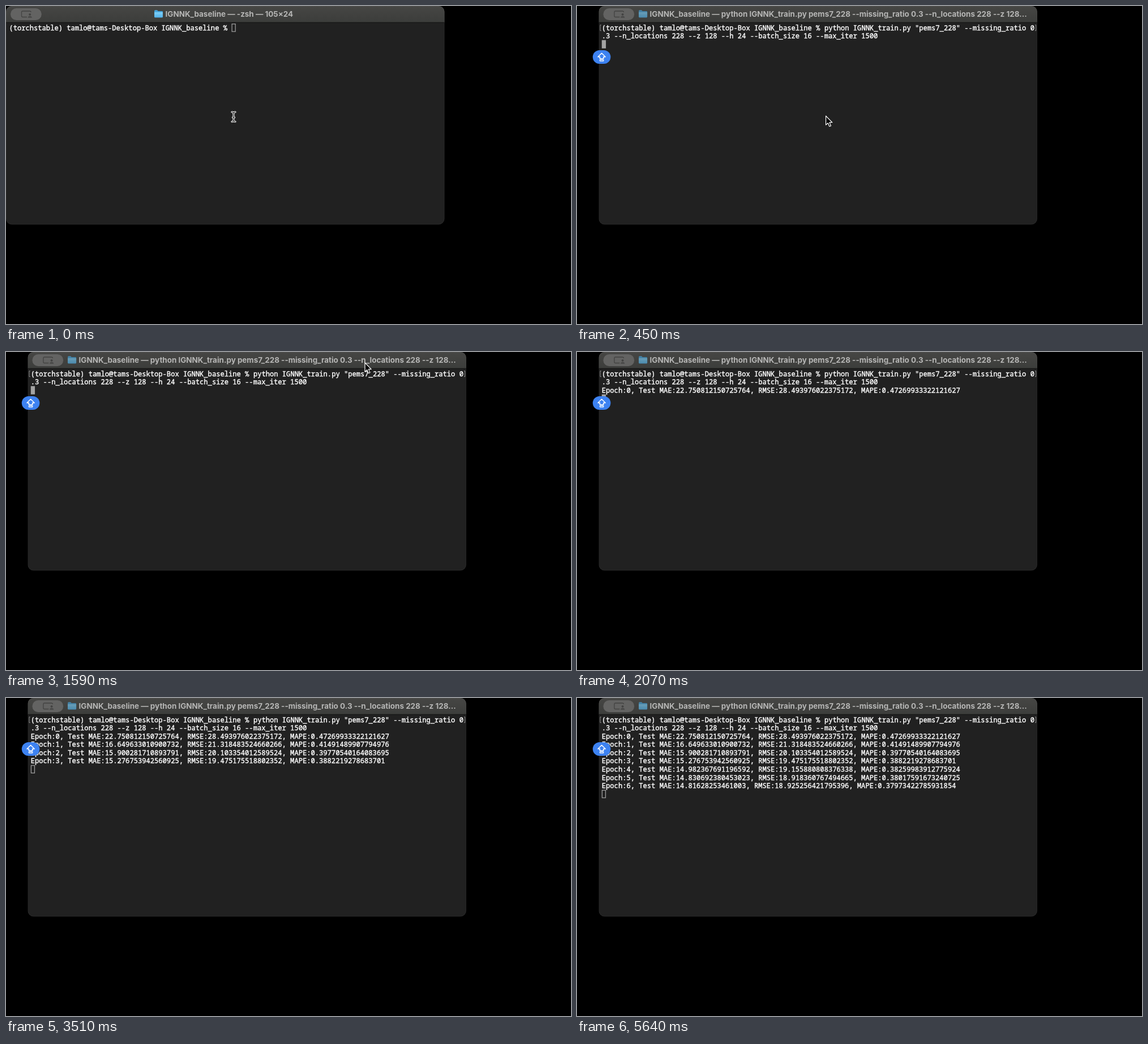
These frames come from a looping animation (998x561 px, 5.67 s). An HTML page:

```html
<!DOCTYPE html>
<html lang="en">
<head>
<meta charset="utf-8">
<title>Terminal training run</title>
<style>
  html, body { margin: 0; width: 100%; height: 100%; overflow: hidden; background: #000; }
  svg { display: block; }
  text { white-space: pre; }
  .mono { font: 500 12.133px "Noto Sans Mono", "DejaVu Sans Mono", monospace; fill: #fff; stroke: #fff; stroke-width: .4px; }
  .selected { font-weight: 400; fill: #161616; stroke: none; }
  .title { font: 700 13.45px Inter, "Liberation Sans", sans-serif; fill: #b6b6b5; }
</style>
</head>
<body>
<svg width="998" height="561" viewBox="0 0 998 561">
  <defs>
    <linearGradient id="bar" x2="0" y2="1">
      <stop offset="0" stop-color="#464644"/>
      <stop offset="1" stop-color="#3c3d3b"/>
    </linearGradient>
    <linearGradient id="folderFill" x2="0" y2="1">
      <stop offset="0" stop-color="#7fd0f8"/>
      <stop offset="1" stop-color="#52b2ea"/>
    </linearGradient>
    <clipPath id="frame"><rect width="774.5" height="385.5" rx="10"/></clipPath>
    <path id="beam" d="M-3-8.5Q0-8.5 0-6Q0-8.5 3-8.5M0-6V6M-3 8.5Q0 8.5 0 6Q0 8.5 3 8.5M-1.5 1H1.5"/>
  </defs>
  <rect width="998" height="561" fill="#000"/>
  <g id="win">
    <g clip-path="url(#frame)">
      <rect width="775" height="386" fill="#212121"/>
      <rect width="775" height="29" fill="url(#bar)"/>
      <rect y="28.6" width="775" height="1" fill="#111"/>
    </g>
    <rect x=".5" y=".5" width="773.5" height="384.5" rx="9.5" fill="none" stroke="#fff" stroke-opacity=".04"/>
    <rect x="8" y="4" width="54.8" height="21" rx="10.5" fill="#636362"/>
    <g fill="none" stroke="#434342" stroke-width="1.3">
      <path d="M37 19.5H29.5a2 2 0 0 1-2-2V11a2 2 0 0 1 2-2H42a2 2 0 0 1 2 2"/>
      <circle cx="42.2" cy="15" r="2" fill="#434342" stroke="none"/>
      <path d="M38.3 20.5a4 3.2 0 0 1 7.8 0z" fill="#434342" stroke="none"/>
    </g>
    <g id="folder">
      <path d="M0 1.5Q0 0 1.5 0H5L6.6 1.7H13.6Q15 1.7 15 3V11.5Q15 13 13.5 13H1.5Q0 13 0 11.5z" fill="#45a5dc"/>
      <path d="M0 3.6H15V11.5Q15 13 13.5 13H1.5Q0 13 0 11.5z" fill="url(#folderFill)"/>
    </g>
    <text id="title" class="title" y="18.8"></text>
    <path id="marks" d="M4.3 33.5H2.6V43.5H4.3M770.6 33.5H772.3V43.5H770.6" fill="none" stroke="#8e8e8e"/>
    <g id="selection" fill="#fff"></g>
    <g id="lines"></g>
    <rect id="caret"/>
    <g id="bubble">
      <rect x="-15.6" y="-11.5" width="31.2" height="24.5" rx="12" fill="#000" opacity=".15"/>
      <rect x="-15.8" y="-12" width="31.6" height="24" rx="12" fill="#3d82f1"/>
      <path d="M0-6.8 6.6-.2H3.2V3H-3.2V-.2H-6.6z" fill="none" stroke="#fff" stroke-width="1.5" stroke-linejoin="round"/>
      <rect x="-3.2" y="4.8" width="6.4" height="2.4" rx=".8" fill="none" stroke="#fff" stroke-width="1.3"/>
    </g>
  </g>
  <g id="ibeam" transform="translate(402 195.5)" fill="none" stroke-linecap="round">
    <use href="#beam" stroke="#fff" stroke-width="3.2"/>
    <use href="#beam" stroke="#111" stroke-width="1.1"/>
  </g>
  <path id="arrow" d="M0 0V15.8L3.7 12.4 6.3 18.5 8.9 17.4 6.4 11.4H11.2z" fill="#000" stroke="#fff" stroke-width="1.2" stroke-linejoin="round"/>
</svg>
<script>
const LOOP = 5670, PASTE = 210, RUN = 390, BLUR = 3510;
const SHIFT = 38.4, CELL = 7.28, ROW = 14.55, LEFT = 5.4, TOP = 31.1;
const PROMPT = '(torchstable) tamlo@tams-Desktop-Box IGNNK_baseline % ';
const COMMAND = [
  'python IGNNK_train.py "pems7_228" --missing_ratio 0',
  '.3 --n_locations 228 --z 128 --h 24 --batch_size 16 --max_iter 1500'
];
const IDLE_TITLE = 'IGNNK_baseline — -zsh — 105×24';
const BUSY_TITLE = 'IGNNK_baseline — python IGNNK_train.py pems7_228 --missing_ratio 0.3 --n_locations 228 --z 128...';
// time, MAE, RMSE, MAPE; strings keep every digit
const EPOCHS = [
  [1800, '22.750812150725764', '28.493976022375172', '0.47269933322121627'],
  [2400, '16.649633010900732', '21.318483524660266', '0.41491489907794976'],
  [2790, '15.900281710893791', '20.103354012589524', '0.39770540164083695'],
  [3390, '15.276753942560925', '19.475175518802352', '0.3882219278683701'],
  [4050, '14.982367691196592', '19.155880808376338', '0.38259983912775924'],
  [4710, '14.830692380453023', '18.918360767494665', '0.38017591673240725'],
  [5370, '14.81628253461003', '18.925256421795396', '0.37973422785931854']
];

const $ = id => document.getElementById(id);
const colX = col => LEFT + col * CELL;
const rowY = row => TOP + row * ROW;
const show = (el, on) => el.setAttribute('visibility', on ? 'visible' : 'hidden');
const move = (el, x, y) => el.setAttribute('transform', `translate(${x} ${y})`);
const setAll = (el, attrs) => {
  for (const key in attrs) el.setAttribute(key, attrs[key]);
};

function add(parent, tag, attrs, content = '') {
  const el = document.createElementNS('http://www.w3.org/2000/svg', tag);
  setAll(el, attrs);
  el.textContent = content;
  return parent.appendChild(el);
}
const addLine = (col, row, content) =>
  add($('lines'), 'text', { class: 'mono', x: colX(col), y: rowY(row) + 11.6 }, content);

add($('selection'), 'rect', { x: colX(54), y: TOP, width: 51 * CELL, height: ROW });
add($('selection'), 'rect', { x: LEFT, y: rowY(1), width: 69 * CELL, height: ROW });
addLine(0, 0, PROMPT);
const command = [addLine(54, 0, COMMAND[0]), addLine(0, 1, COMMAND[1])];
const results = EPOCHS.map(([, mae, rmse, mape], i) =>
  addLine(0, i + 2, `Epoch:${i}, Test MAE:${mae}, RMSE:${rmse}, MAPE:${mape}`));

function pointerAt(t) {
  const mix = (a, b, k) => a + (b - a) * k;
  const leg = (t0, t1, x0, y0, x1, y1, ease = k => k) => {
    const k = ease(Math.min(1, Math.max(0, (t - t0) / (t1 - t0))));
    return [mix(x0, x1, k), mix(y0, y1, k)];
  };
  if (t < RUN) return [401.2, 194];
  if (t < 1140) return leg(480, 1140, 439.6, 194, 630, 21, k => 1 - (1 - k) ** 2);
  if (t < 1590) return leg(1140, 1590, 630, 21, 634, 19);
  if (t < 2040) return leg(1590, 1860, 634, 19, 640, 9);
  return [654, -2];
}

function placeCaret(t, pasted, running, done) {
  const col = running ? 0 : pasted ? 69 : 54;
  const row = running ? 2 + done : pasted ? 1 : 0;
  const hollow = !pasted || t >= BLUR;
  const inset = hollow ? 0.6 : 0;
  setAll($('caret'), {
    x: colX(col) + inset, y: rowY(row) + inset,
    width: CELL - 2 * inset, height: ROW - 2 * inset,
    fill: hollow ? 'none' : '#a3a3a3',
    stroke: hollow ? '#a3a3a3' : 'none', 'stroke-width': 1.2
  });
}

function draw(t) {
  const pasted = t >= PASTE, running = t >= RUN;
  const done = EPOCHS.filter(epoch => t >= epoch[0]).length;

  move($('win'), running ? SHIFT : 0, 0);
  move($('folder'), running ? 70.7 : 262, 7.3);
  $('folder').setAttribute('opacity', running ? 0.65 : 1);
  $('title').setAttribute('x', running ? 90.2 : 281.6);
  $('title').textContent = running ? BUSY_TITLE : IDLE_TITLE;
  show($('marks'), running);

  show($('selection'), pasted && !running);
  command.forEach(line => {
    show(line, pasted);
    line.classList.toggle('selected', !running);
  });
  results.forEach((line, i) => show(line, i < done));
  placeCaret(t, pasted, running, done);

  show($('bubble'), pasted);
  if (running) move($('bubble'), 5.2, 90);
  else move($('bubble'), 507.2, 75.5);

  show($('ibeam'), !pasted);
  show($('arrow'), pasted && t < 2070);
  move($('arrow'), ...pointerAt(t));
}

const start = performance.now();
function tick() {
  draw((performance.now() - start) % LOOP);
  requestAnimationFrame(tick);
}
draw(0);
requestAnimationFrame(tick);
</script>
</body>
</html>
```
